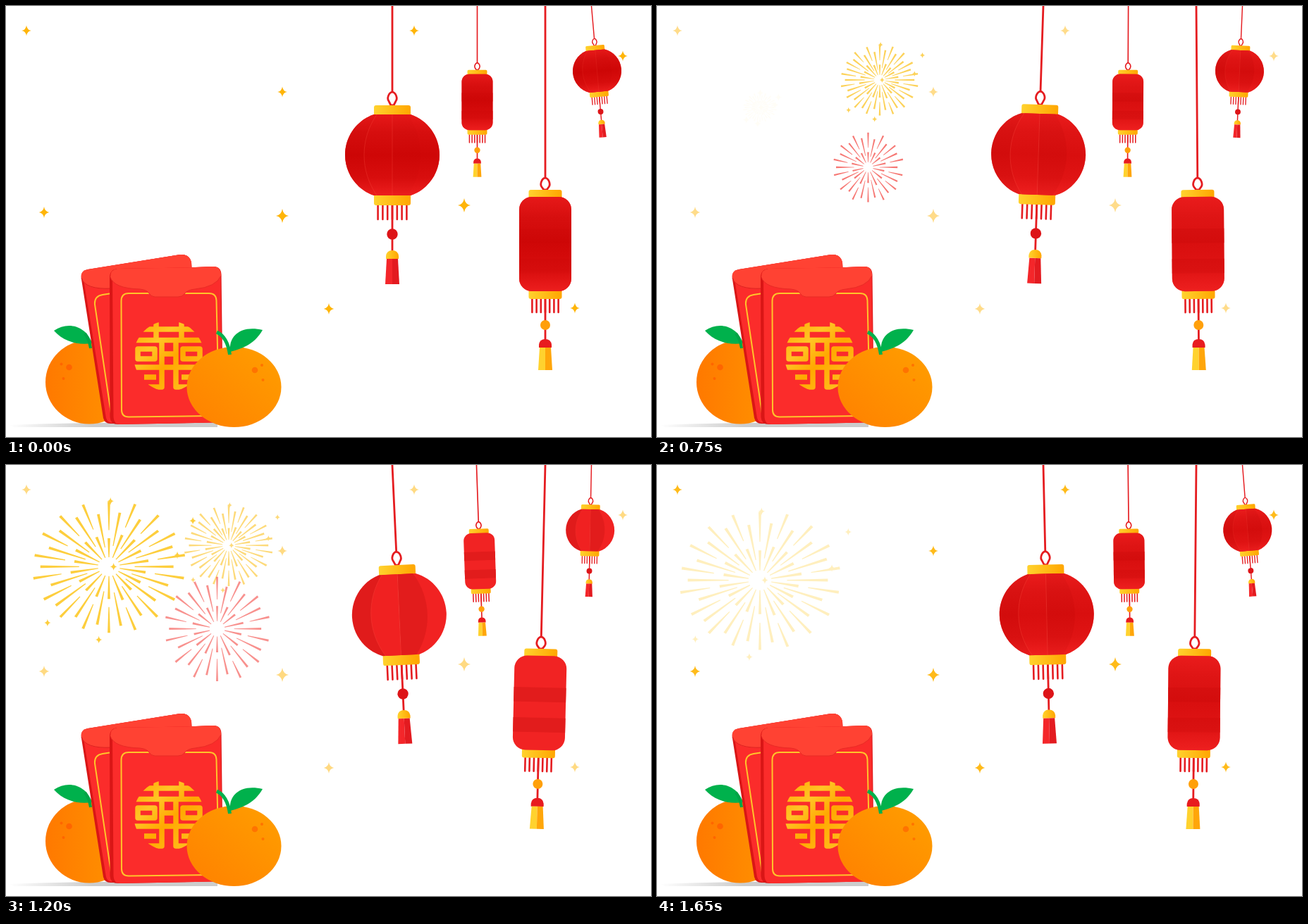
Animation of 915 by 612 pixels, one loop 1800 ms. Source, as an HTML page:

```html
<!DOCTYPE html>
<html lang="en">
<head>
<meta charset="utf-8">
<title>Lanterns and fireworks</title>
<style>
html, body { margin: 0; width: 100%; height: 100%; overflow: hidden; background: #fff; }
svg { display: block; width: 915px; height: 612px; }
</style>
</head>
<body>
<svg viewBox="0 0 915 612">
  <defs>
    <linearGradient id="gold"><stop stop-color="#ffd22e"/><stop offset="1" stop-color="#ffa600"/></linearGradient>
    <linearGradient id="emblem" gradientUnits="userSpaceOnUse" x1="185" y1="450" x2="275" y2="546">
      <stop stop-color="#ffa900"/><stop offset=".3" stop-color="#ffc526"/><stop offset=".55" stop-color="#ffa800"/><stop offset="1" stop-color="#ffc526"/>
    </linearGradient>
    <linearGradient id="fruit"><stop stop-color="#ff7900"/><stop offset="1" stop-color="#ff9600"/></linearGradient>
    <linearGradient id="fruit2" x1="0" y1="1" x2="1" y2="0"><stop stop-color="#ff8000"/><stop offset="1" stop-color="#ff9f00"/></linearGradient>
    <linearGradient id="ground"><stop stop-color="#ccc" stop-opacity="0"/><stop offset=".4" stop-color="#ccc"/></linearGradient>
    <linearGradient id="deep" x2="0" y2="1">
      <stop stop-color="#e51717"/><stop offset=".22" stop-color="#d20b0b"/><stop offset=".5" stop-color="#c90202"/>
      <stop offset=".78" stop-color="#d40a0a"/><stop offset="1" stop-color="#ec1d1d"/>
    </linearGradient>
    <clipPath id="disc"><circle cx="231" cy="497" r="50"/></clipPath>
  </defs>

  <g id="stars" fill="#ffb508"></g>
  <g id="bursts"></g>

  <path d="M4 595Q120 590 300 592V598H10Z" fill="url(#ground)"/>

  <g>
    <ellipse cx="118" cy="534" rx="62" ry="59.5" fill="url(#fruit)"/>
    <g fill="#ff6500"><circle cx="89.5" cy="513" r="4.3"/><circle cx="78.5" cy="508.5" r="2"/><circle cx="81.5" cy="529" r="2"/></g>
    <path d="M68 461C87 448 113 453 122 479C103 482 82 477 68 461Z" fill="#00b14c"/>
    <path d="M112 465Q118 473 120 486" fill="none" stroke="#00a447" stroke-width="4"/>
  </g>

  <g>
    <path d="M107 388Q105 376 116 374L247 353Q260 352 263 364L265 400L180 593L148 593Q140 593 138 585Z" fill="#d91616"/>
    <path d="M110 388Q108 376 118 374L247 353Q260 352 263 364L265 400L180 593L151 592Q144 592 142 585Z" fill="#fb2c2b"/>
    <path d="M107 386Q105 376 116 374L247 353Q260 352 263 364L262 392L150 401Q112 404 107 386Z" fill="#ff4233"/>
    <path d="M107 386Q112 403 150 401" fill="none" stroke="#dd2020"/>
    <path d="M150 408L137 410Q125 412 126 424L150 585" fill="none" stroke="#ffc42a" stroke-width="2"/>
  </g>

  <g>
    <path d="M147 386Q147 374 158 373L256 371.5L294 370Q305 370 305.500 381L308 582Q308 591 298 591.500L159 594Q148 594 147.500 584Z" fill="#d91616"/>
    <path d="M151 386Q151 374 161 373L256 371.5L294 370Q304 370 304.500 381L307 582Q307 591 297 591.500L162 594Q153 594 152.500 584Z" fill="#fb2c2b"/>
    <path d="M174 408H288Q298 408 298.5 418L302 572Q302 582 291 582L174 583.5Q164 583.500 164 573.500L163.500 419Q163.500 408 174 408Z" fill="none" stroke="#ffc42a" stroke-width="2"/>
    <path d="M148 385Q148 374 158 373L256 371.5L294 370Q305 370 305 383Q298 399 268 402Q257 403 253 409Q250 413 244 413H211Q206 413 202 407Q199 403 190 402Q153 401 148 385Z" fill="#ff4233"/>
    <path d="M305 383Q298 399 268 402Q257 403 253 409Q250 413 244 413H211Q206 413 202 407Q199 403 190 402Q153 401 148 385" fill="none" stroke="#e82a25"/>
    <g clip-path="url(#disc)" fill="none" stroke="url(#emblem)" stroke-width="7.5" stroke-linejoin="round">
      <path d="M213 447V475M249 447V475M192 459H270M182 474.500H280M181 513H281M221 474V541H202M241 474V541H260M221 494H241"/>
      <path d="M187 487H211V501H187ZM251 487H275V501H251ZM196 527H213M249 527H266"/>
    </g>
  </g>

  <g>
    <ellipse cx="323.5" cy="541" rx="67" ry="57" fill="url(#fruit2)"/>
    <g fill="#ff7300"><circle cx="353" cy="517" r="4.3"/><circle cx="363" cy="510" r="2"/><circle cx="364.5" cy="531" r="2"/></g>
    <path d="M318 491C315 467 335 453 364 460C354 478 338 486 318 491Z" fill="#00b14c"/>
    <path d="M299 463Q314 470 317.5 495" fill="none" stroke="#00b14c" stroke-width="5"/>
  </g>

  <g id="lanterns"></g>
</svg>
<script>
const STEP = 150, STEPS = 12, TAU = 2 * Math.PI;
const $ = id => document.getElementById(id);
const clamp = v => Math.max(0, Math.min(1, v));

function el(parent, name, attrs) {
  const e = document.createElementNS('http://www.w3.org/2000/svg', name);
  set(e, attrs);
  return parent.appendChild(e);
}
function set(e, attrs) {
  for (const k in attrs) e.setAttribute(k, attrs[k]);
}
function star(x, y, r) {
  const k = r * .13, w = r * .9;
  return `M${x} ${y - r}Q${x + k} ${y - k} ${x + w} ${y}Q${x + k} ${y + k} ${x} ${y + r}` +
    `Q${x - k} ${y + k} ${x - w} ${y}Q${x - k} ${y - k} ${x} ${y - r}Z`;
}
function seeded(seed) {
  return () => (seed = seed * 16807 % 2147483647) / 2147483647;
}

// Smooth looping curve through [step, value] keys, flat at the extremes
function curve(keys, step) {
  const n = keys.length;
  const key = i => {
    const lap = Math.floor(i / n), [s, v] = keys[i - lap * n];
    return [s + lap * STEPS, v];
  };
  const slope = i => {
    const [a, b, c] = [key(i - 1), key(i), key(i + 1)];
    return (b[1] - a[1]) * (c[1] - b[1]) <= 0 ? 0 : (c[1] - a[1]) / (c[0] - a[0]);
  };
  let i = -1;
  while (key(i + 1)[0] <= step) i++;
  const [s0, v0] = key(i), [s1, v1] = key(i + 1), h = s1 - s0, u = (step - s0) / h;
  return v0 + (v1 - v0) * u * u * (3 - 2 * u) +
    h * u * (1 - u) * (slope(i) * (1 - u) - slope(i + 1) * u);
}

const stars = $('stars');
[[29, 35, 7.5], [579, 35, 7.5], [392, 122, 7.5], [875, 71, 7.5], [54, 293, 8],
 [392, 298, 10], [650, 283, 10], [458, 430, 8], [807, 429, 7.5]]
  .forEach(s => el(stars, 'path', { d: star(...s) }));

// Fireworks: each grows with an ease-out, peaks, then fades and falls
const PEAK = 3;
const bursts = [
  { x: 146, y: 144, r: 116, squash: .87, start: 4.5, grow: 4.5, fall: 1.6, n: 36, width: 4, color: '#fdc928',
    gems: true, trail: [146, 257, 58] },
  { x: 316, y: 105, r: 64, squash: .92, start: 2.8, grow: 3.4, fall: 1.9, n: 36, width: 2.8, color: '#fbbe12', gems: true },
  { x: 299.5, y: 229, r: 77, squash: 1, start: 2.8, grow: 5.2, fall: .75, n: 28, width: 3, color: '#f33c36',
    trail: [300, 288, 29] }
];
const gemSpots = [[.02, -.97], [1.08, -.68], [.88, -.17], [-.79, .83], [-.13, 1.08], [.06, 0]];

function ray(b, y, r, angle, from, to) {
  const c = Math.cos(angle), s = Math.sin(angle), half = b.width / 2 * (.3 + .7 * r / b.r);
  const at = (d, o) => (b.x + c * r * d - s * o).toFixed(1) + ' ' + (y + s * r * b.squash * d + c * o).toFixed(1);
  return `M${at(from, -half * .3)}L${at(to, -half)}L${at(to, half)}L${at(from, half * .3)}Z`;
}
function burstPath(b, age) {
  const u = clamp(age / b.grow), r = b.r * u * (2 - u);
  const y = b.y + b.fall * Math.max(0, age - PEAK) ** 2;
  const rand = seeded(b.r);
  let d = '';
  for (let i = 0; i < b.n; i++) {
    const angle = (i / b.n - .25) * TAU, j = (rand() - .5) * .12;
    if (i % 2) d += ray(b, y, r, angle, .34 + j, .84 + j);
    else d += ray(b, y, r, angle, .14, .48 + j) + ray(b, y, r, angle, .6 + j, .98 + j / 3);
  }
  if (b.gems) for (const [gx, gy] of gemSpots) d += star(b.x + gx * r, y + gy * r * b.squash, b.width + 1.3);
  return d;
}
function trailPath([x, y, len]) {
  const w = len * .027;
  return `M${x - w} ${y}h${2 * w}l${-w * .5} ${len * .25}h${-w}ZM${x - w} ${y + len * .37}h${2 * w}L${x} ${y + len}Z`;
}
function drawBurst(b, step) {
  const age = step - b.start;
  const flying = b.trail && age >= -1 && age < 0;
  set(b.node, {
    d: age > 0 ? burstPath(b, age) : flying ? trailPath(b.trail) : '',
    opacity: flying ? 1 : clamp(1 - (age < PEAK ? (PEAK - age) / 2.6 : (age - PEAK) / 5))
  });
}
for (const b of bursts) b.node = el($('bursts'), 'path', { fill: b.color });

// Lanterns: swing holds [step, degrees] keys
const lanterns = [
  { x: 548, y: 121, scale: 1, round: true, pivot: [576, 0], swing: [[0, 0], [3.6, 3.8], [6, 0], [9, -3.2]] },
  { x: 668.5, y: 80, scale: .594, pivot: [668.5, 30], swing: [[0, 0], [2.5, 2], [8, -2]] },
  { x: 765, y: 243, scale: 1, pivot: [765, 0], swing: [[0, 0], [2.8, -.95], [6, 0], [8.6, 1.5]] },
  { x: 830.5, y: 46, scale: .515, round: true, pivot: [830.5, 0], swing: [[6, 3], [10, -2.2], [11.5, -5.1]] }
];

function buildLantern(l) {
  l.node = el($('lanterns'), 'g', {});
  const g = el(l.node, 'g', { transform: `translate(${l.x} ${l.y}) scale(${l.scale})` });
  const path = (d, fill) => el(g, 'path', { d, fill });
  const rect = (x, y, width, height, fill, rx = 0) => el(g, 'rect', { x, y, width, height, rx, fill });
  const line = (d, w) => el(g, 'path', { d, fill: 'none', stroke: '#e51c20', 'stroke-width': w, 'stroke-linecap': 'round' });
  const m = l.round
    ? { cap: 20, top: 33, low: 147, base: 162, hair: 182, bead: 203, knot: 226, half: 26, gap: 6.8 }
    : { cap: 18, top: 28, low: 162, base: 173, hair: 192, bead: 210, knot: 230, half: 23.5, gap: 6.2 };

  line('M0 -460V1', 2.8);
  line(`M0 1C-5 2 -8 10 -5 14L-2 ${m.cap}H2L5 14C8 10 5 2 0 1Z`, 2.8);
  line(`M0 ${m.base}V${m.knot + 2}`, 2.8);
  for (let i = -3; i <= 3; i++) line(`M${i * m.gap} ${m.base}V${m.hair}`, 2.6);
  el(g, 'circle', { cy: m.bead, r: l.round ? 7.7 : 7, fill: l.round ? '#dd1418' : '#ffa00a' });

  const k = m.knot, mid = k + 12;
  path(`M-9 ${mid}V${k + 8}Q-8 ${k} 0 ${k}Q8 ${k} 9 ${k + 8}V${mid}Z`, l.round ? 'url(#gold)' : '#e81b1f');
  path(`M-8 ${mid}H0V274H-10Z`, l.round ? '#f4262a' : '#ffd22e');
  path(`M0 ${mid}H8L10 274H0Z`, l.round ? '#e31b20' : '#ffa60a');
  rect(-m.half, m.cap, m.half * 2, m.top - m.cap + 3, 'url(#gold)', 3);
  rect(-m.half, m.low - 3, m.half * 2, m.base - m.low + 3, 'url(#gold)', 3);

  if (l.round) {
    const left = 'M0 33H-26C-50 41 -67 64 -67 90.5C-67 117 -50 140 -26 148H0Z';
    const right = 'M0 33H26C50 41 67 64 67 90.5C67 117 50 140 26 148H0Z';
    path(left, '#e01b1b');
    path(right, '#f12222');
    path('M0 33H-22C-46 68 -46 113 -22 148H0Z', '#f02121');
    path('M0 33H22C46 68 46 113 22 148H0Z', '#e21c1c');
    l.dark = path(left + right, 'url(#deep)');
    el(g, 'path', { d: 'M0 33V148M-22 33C-46 68 -46 113 -22 148', fill: 'none', stroke: '#ff5a4a', 'stroke-opacity': .35, 'stroke-width': .8 });
  } else {
    rect(-37, 28, 74, 134, '#f12323', 18);
    for (const y of [73, 116]) rect(-37, y, 74, 20.5, '#e21c1c');
    l.dark = rect(-37, 28, 74, 134, 'url(#deep)', 18);
  }
}
lanterns.forEach(buildLantern);

function draw(step) {
  const t = step / STEPS;
  set(stars, { opacity: .7 + .3 * Math.cos((t - .03) * TAU) });
  for (const b of bursts) drawBurst(b, step);
  // Shading deepens twice per loop, as the lanterns pass upright
  const shade = .85 * Math.sqrt(clamp(Math.cos(2 * t * TAU)));
  for (const l of lanterns) {
    set(l.node, { transform: `rotate(${curve(l.swing, step)} ${l.pivot})` });
    set(l.dark, { opacity: shade });
  }
}

let shown = -1;
const begin = performance.now();
function tick() {
  const step = Math.floor((performance.now() - begin) / STEP) % STEPS;
  if (step !== shown) draw(shown = step);
  requestAnimationFrame(tick);
}
tick();
</script>
</body>
</html>
```
